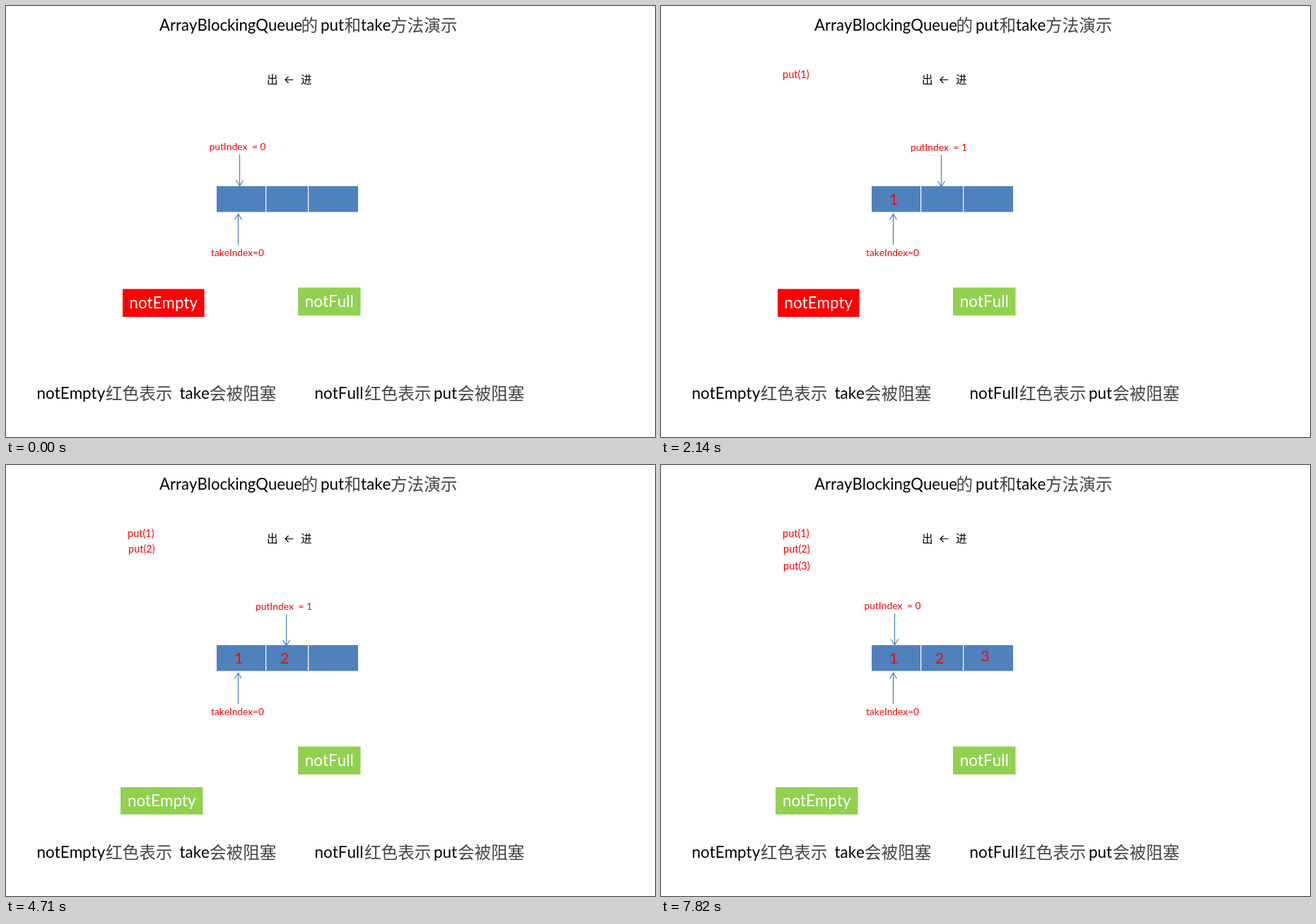
Write an HTML page with a canvas that moves like this. It is 918 px wide and 610 px high and loops after 8 s.

```html
<!DOCTYPE html>
<html lang="zh">
<head>
<meta charset="utf-8">
<title>ArrayBlockingQueue</title>
<style>
html, body { margin: 0; width: 100%; height: 100%; overflow: hidden; background: #fff; }
canvas { display: block; }
</style>
</head>
<body>
<canvas id="stage" width="918" height="610"></canvas>
<script>
const ctx = document.getElementById('stage').getContext('2d');
ctx.fontKerning = 'none';
const LOOP = 8000, STEP = 77.5;
const RED = '#f00', GREEN = '#92d050', BLUE = '#4f81bd', LINE = '#4a7ebb';
const LATIN = 'Lato, Carlito, sans-serif';
const CJK = '"Noto Sans CJK SC", "Noto Sans CJK", sans-serif';

// Each burst of motion restarts the stepped clock.
const beats = [210, 1590, 2840, 3780, 5240, 5870, 7360];

const puts = [
  { label: 'put(1)', x: 172, from: 12, to: 97, start: 210, end: 532 },
  { label: 'put(2)', x: 173, from: -3, to: 119.5, start: 3780, end: 4165 },
  { label: 'put(3)', x: 173, from: 8, to: 143.5, start: 5870, end: 6232 }
];
const items = [
  { label: '1', x: 329, y: 281, start: 571, end: 1019 },
  { label: '2', x: 394, y: 281, start: 4222, end: 4657 },
  { label: '3', x: 458.5, y: 278, start: 6300, end: 6780 }
];
const pointers = [
  { n: 0, x: 287.5, arrow: 330.5, y: 0, start: -500, hide: 1590 },
  { n: 1, x: 353, arrow: 396.5, y: 1.3, start: 1625, hide: 5240 },
  { n: 2, x: 416, arrow: 459.5, y: 1.3, start: 5240, hide: 7360 },
  { n: 0, x: 287.5, arrow: 330.5, y: 0, start: 7360, hide: LOOP }
];

const progress = (t, a, b) => Math.min(1, Math.max(0, (t - a) / (b - a)));
const mix = (a, b, p) => a + (b - a) * p;

function heldTime(t) {
  const beat = beats.filter(b => b <= t).pop();
  if (beat === undefined) return 0;
  return beat + Math.min(12, Math.floor((t - beat + 8) / STEP)) * STEP;
}

function text(str, x, y, size, color = '#000', align = 'left') {
  ctx.font = `${size}px ${LATIN}`;
  ctx.fillStyle = color;
  ctx.textAlign = align;
  ctx.fillText(str, x, y);
}

function han(str, x, y, size, color = '#444') {
  ctx.font = `300 ${size}px ${CJK}`;
  ctx.fillStyle = color;
  ctx.textAlign = 'left';
  ctx.fillText(str, x, y);
}

function box(x, y, w, h, color) {
  ctx.fillStyle = color;
  ctx.fillRect(x, y, w, h);
}

function tag(label, x, y, w, h, color, alpha = 1) {
  ctx.globalAlpha = alpha;
  box(x, y, w, h, color);
  ctx.globalAlpha = 1;
  text(label, x + w / 2, y + 27, 22.4, '#fff', 'center');
}

function arrow(x, tail, tip) {
  const back = tip - Math.sign(tip - tail) * 8;
  ctx.strokeStyle = LINE;
  ctx.lineWidth = 1.2;
  ctx.beginPath();
  ctx.moveTo(x, tail);
  ctx.lineTo(x, tip);
  ctx.moveTo(x - 5, back);
  ctx.lineTo(x, tip);
  ctx.lineTo(x + 5, back);
  ctx.stroke();
}

function drawLabels() {
  text('ArrayBlockingQueue', 217, 35, 22.1);
  han('的', 417.5, 35.5, 23.6);
  text('put', 445, 35, 22.4);
  han('和', 478.5, 35.5, 23.6);
  text('take', 502, 35, 22.4);
  han('方法演示', 544, 35.5, 23.6);

  han('出', 369, 109.5, 15.5, '#000');
  han('进', 417, 109.5, 15.5, '#000');
  ctx.strokeStyle = '#000';
  ctx.lineWidth = 1.2;
  ctx.beginPath();
  ctx.moveTo(406.5, 104.5);
  ctx.lineTo(395, 104.5);
  ctx.moveTo(399.5, 100);
  ctx.lineTo(395, 104.5);
  ctx.lineTo(399.5, 109);
  ctx.stroke();

  text('notEmpty', 43.5, 556, 22.4);
  han('红色表示', 141, 557, 23.6);
  text('take', 245.5, 556, 22.4);
  han('会被阻塞', 288, 557, 23.6);
  text('notFull', 436.5, 556, 22.4);
  han('红色表示', 507, 557, 23.6);
  text('put', 605, 556, 22.4);
  han('会被阻塞', 639, 557, 23.6);
}

function drawQueue() {
  box(298, 255, 200, 36.5, BLUE);
  box(367, 255, 1.2, 36.5, '#fff');
  box(427, 255, 1.2, 36.5, '#fff');
  arrow(328.5, 338, 294.5);
  text('takeIndex=0', 290, 354, 13.7, RED);
}

function drawNotEmpty(t) {
  if (t < 2840) {
    tag('notEmpty', 165, 400.5, 115.5, 39.5, RED);
    return;
  }
  const p = progress(t, 2780, 3610) ** 1.2;
  tag('notEmpty', 162, 456 + 68.8 * (1 - p), 116.5, 38.7, GREEN, p);
}

function drawPointer({ n, x, arrow: ax, y, start, hide }, t) {
  if (t < start || t >= hide) return;
  const top = y - 258 * (1 - progress(t, start, start + 440));
  text('putIndex', x, top + 203.5, 13.8, RED);
  text('= ' + n, x + 60.5, top + 203.5, 13.8, RED);
  arrow(ax, top + 210, top + 254.5);
}

function draw(t) {
  box(0, 0, 918, 610, '#fff');
  drawNotEmpty(t);
  tag('notFull', 413, 398.5, 88.5, 39.5, GREEN);
  drawLabels();
  drawQueue();
  for (const p of pointers) drawPointer(p, t);
  for (const p of puts) {
    if (t >= p.start) text(p.label, p.x, mix(p.from, p.to, progress(t, p.start, p.end)) + 4.5, 14.5, RED);
  }
  for (const i of items) {
    if (t >= i.start) text(i.label, mix(925, i.x, progress(t, i.start, i.end)), i.y, 21, RED, 'center');
  }
}

const origin = performance.now();
function frame() {
  draw(heldTime((performance.now() - origin) % LOOP));
  requestAnimationFrame(frame);
}
frame();
</script>
</body>
</html>
```
